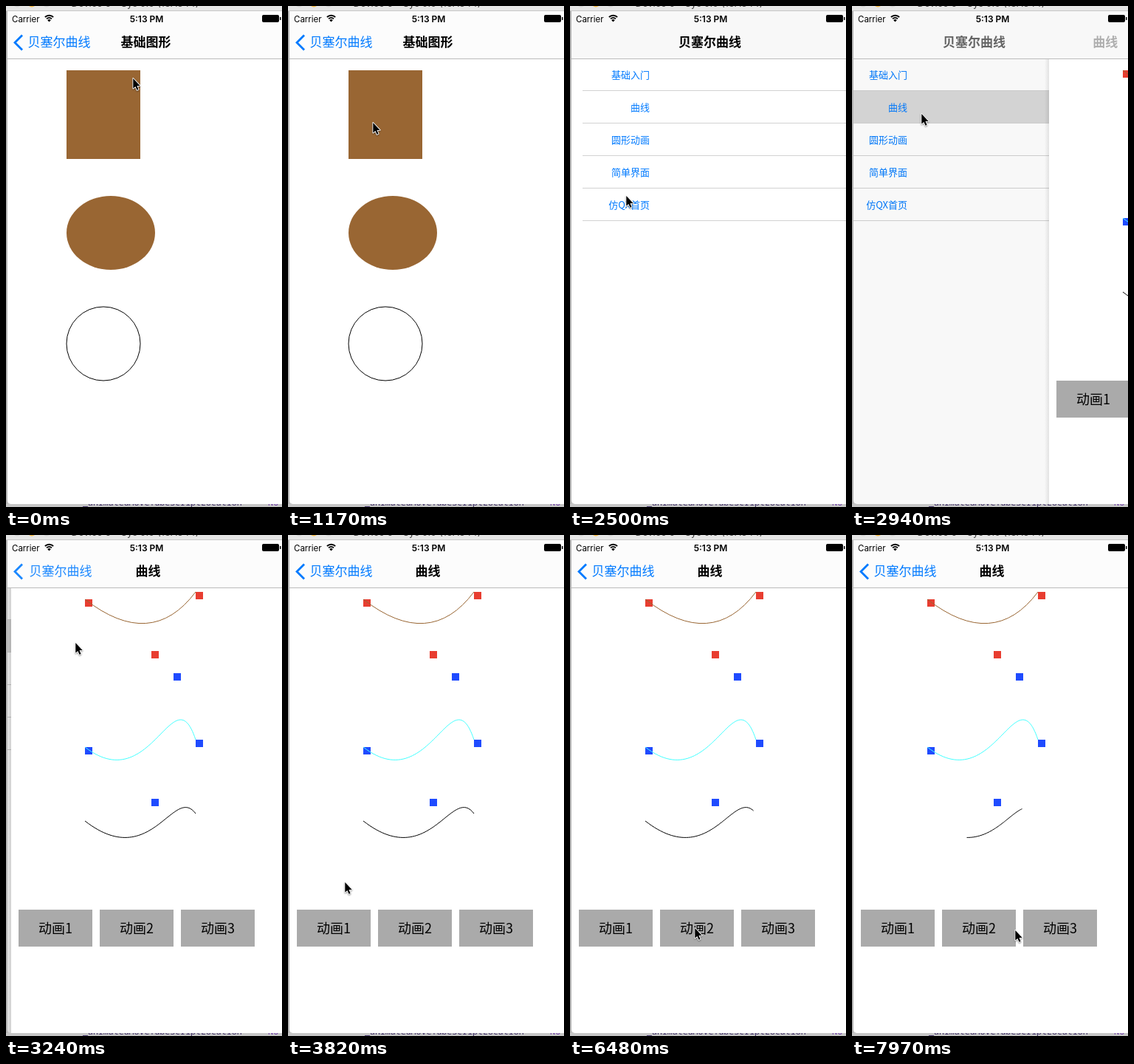
These frames come from a looping animation (374x678 px, 8 s). An HTML page with a canvas:

```html
<!DOCTYPE html>
<html lang="zh">
<head>
<meta charset="utf-8">
<style>
  html, body { margin: 0; width: 100%; height: 100%; overflow: hidden; }
  canvas { display: block; width: 374px; height: 678px; }
</style>
</head>
<body>
<canvas id="stage" width="374" height="678"></canvas>
<script>
const ctx = document.getElementById('stage').getContext('2d');
const LOOP = 8000, STEP = 147.5, WIDTH = 375, BAR_BOTTOM = 71;
const POP_START = 1911, PUSH_START = 2880, GROW_START = 4555, SPREAD_START = 6880;
const CJK = '"Noto Sans CJK SC", "Noto Sans CJK", sans-serif';
const LATIN = 'Inter, Roboto, sans-serif';
const BLUE = '#007aff';

// Resting points of the pointer: ms, x, y.
const pointerStops = [
  [0, 172, 97], [600, 205, 274], [1170, 115, 157], [1900, 43, 62], [2300, 43, 62],
  [2500, 76, 256], [2650, 94, 145], [3380, 94, 145], [3970, 74, 527],
  [5300, 74, 527], [6630, 172, 531], [7375, 172, 531], [7970, 221, 534]
];

const clamp = v => Math.max(0, Math.min(1, v));
const lerp = (a, b, k) => a + (b - a) * k;
const smooth = k => k * k * (3 - 2 * k);

// Critically damped spring from 0 to 1.
function spring(ms) {
  const x = Math.max(0, ms) * .018;
  return 1 - (1 + x) * Math.exp(-x);
}

function screenAt(time) {
  const pushing = time >= PUSH_START;
  const elapsed = time - (pushing ? PUSH_START : POP_START);
  const progress = spring(elapsed);
  const covered = pushing ? progress : 1 - progress;
  const fadeOut = (1 - progress) ** 1.5, fadeIn = progress ** 9;
  const travel = progress ** 1.3;
  const offset = Math.round(WIDTH * (1 - covered));
  return {
    pushing, covered, offset,
    rootX: lerp(189.5, 72, pushing ? travel : 1 - travel),
    rootBlack: pushing ? fadeOut : fadeIn,
    rootBlue: pushing ? fadeIn : fadeOut,
    titleX: 189.5 + offset * .58,
    highlight: pushing ? 1 : clamp(1.7 - elapsed / 250)
  };
}

function pointerAt(time) {
  const next = Math.max(1, pointerStops.findIndex(stop => stop[0] >= time));
  const [t0, x0, y0] = pointerStops[next - 1], [t1, x1, y1] = pointerStops[next];
  const k = smooth(clamp((time - t0) / (t1 - t0)));
  return [Math.round(lerp(x0, x1, k)), Math.round(lerp(y0, y1, k))];
}

function rect(x, y, w, h, fill) {
  ctx.fillStyle = fill;
  ctx.fillRect(x, y, w, h);
}

function text(str, x, y, font, fill = '#000', align = 'left', alpha = 1) {
  ctx.save();
  ctx.globalAlpha = alpha;
  ctx.font = font;
  ctx.fillStyle = fill;
  ctx.textAlign = align;
  ctx.fillText(str, x, y);
  ctx.restore();
}

function path(build, stroke, fill, width = 1) {
  ctx.beginPath();
  build();
  ctx.lineWidth = width;
  if (fill) { ctx.fillStyle = fill; ctx.fill(); }
  if (stroke) { ctx.strokeStyle = stroke; ctx.stroke(); }
}

function polyline(points) {
  points.forEach(([x, y]) => ctx.lineTo(x, y));
}

// Part of a cubic curve between the parameters from and to.
function cubic(points, color, from = 0, to = 1) {
  path(() => {
    for (let i = 0; i <= 60; i++) {
      const t = lerp(from, to, i / 60), u = 1 - t;
      const weights = [u * u * u, 3 * u * u * t, 3 * u * t * t, t * t * t];
      const sum = axis => weights.reduce((s, w, j) => s + w * points[j][axis], 0);
      ctx.lineTo(sum(0), sum(1));
    }
  }, color);
}

function drawDesktop() {
  rect(0, 0, 374, 678, '#c6c6c6');
  rect(0, 0, 374, 7, '#e6e6e6');
  ['#d2d2d2', '#f5b83d', '#d2d2d2'].forEach((color, i) =>
    path(() => ctx.arc(15 + 20 * i, -4.5, 6, 0, 7), null, color));
  text('Device 6 - Sys 9.0 (13A344)', 175, 1, '13px ' + LATIN, '#444', 'center');
  rect(0, 6, 374, 1, '#c8c8c8');
  text('_animatedMoveTubeScriptLocation', 104, 676, '11.6px "Noto Sans Mono", monospace', '#3b2a66');
  text('No', 355, 676, '12px "Noto Sans Mono", monospace', '#703daa');
  rect(0, 7, 2, 667, '#b4b4b4');
}

function drawList({ covered, pushing, highlight }) {
  const x = 2 - Math.round(.3 * WIDTH * covered);
  rect(2, 64, 372, 612, '#fff');
  if (covered > 0) {
    ctx.globalAlpha = highlight;
    rect(2, BAR_BOTTOM + (pushing ? 44 : 0), 372, 44, '#d9d9d9');
    ctx.globalAlpha = 1;
  }
  ['基础入门', '曲线', '圆形动画', '简单界面', '仿QX首页'].forEach((label, i) => {
    text(label, x + 106, 98 + 44 * i, '13px ' + CJK, BLUE, 'right');
    rect(Math.max(2, x + 15), 114 + 44 * i, 372, 1, '#d2d2d2');
  });
  rect(2, 64, 372, 612, `rgba(0,0,0,${.1 * covered})`);
}

function drawShapes() {
  rect(80, 87, 100, 120, '#996633');
  path(() => ctx.ellipse(140, 307, 60, 50, 0, 0, 7), null, '#996633');
  path(() => ctx.arc(130, 457, 50, 0, 7), '#000');
}

function drawCurves(time) {
  const squares = (color, corners) => corners.forEach(([x, y]) => rect(x, y, 10, 10, color));
  const start = [100, 287], pull = [190, 357], lift = [220, 187], end = [250, 277];
  squares('#e83d30', [[100, 87], [190, 157], [250, 77]]);
  squares('#1f4bff', [start, pull, lift, end]);
  path(() => {
    ctx.moveTo(100, 87);
    ctx.quadraticCurveTo(190, 157, 250, 77);
  }, '#996633');
  cubic([start, pull, lift, end], '#4ff');

  // First the line grows from its start, later from its middle to both ends.
  const grow = (time - GROW_START) / 2000, spread = (time - SPREAD_START) / 4000;
  const from = spread > 0 ? .5 - spread : 0;
  const to = spread > 0 ? .5 + spread : grow > 0 ? Math.min(1, grow) : 1;
  cubic([[100, 387], [190, 457], [220, 337], [250, 377]], '#000', from, to);

  for (let i = 0; i < 3; i++) {
    rect(10 + 110 * i, 507, 100, 50, '#aaa');
    text('动画' + (i + 1), 60 + 110 * i, 539, '18px ' + CJK, '#000', 'center');
  }
}

function drawPage({ offset, pushing }, time) {
  const left = 2 + offset;
  const shade = ctx.createLinearGradient(left - 6, 0, left, 0);
  shade.addColorStop(0, 'rgba(0,0,0,0)');
  shade.addColorStop(1, 'rgba(0,0,0,.09)');
  rect(left - 6, 64, 6, 612, shade);
  rect(left, 64, 374, 612, '#fff');
  ctx.save();
  ctx.translate(left, 0);
  if (pushing) drawCurves(time); else drawShapes();
  ctx.restore();
}

function drawBar({ covered, pushing, rootX, rootBlack, rootBlue, titleX }) {
  rect(2, 7, 372, 64, covered < .5 ? '#f8f8f8' : '#fcfcfc');
  rect(2, BAR_BOTTOM, 372, 1, '#bcbcbc');

  text('Carrier', 8, 21.5, '11.5px ' + LATIN);
  text('5:13 PM', 190.5, 21.5, '600 12px ' + LATIN, '#000', 'center');
  [8.2, 5].forEach(r => path(() => ctx.arc(58.5, 21, r, -2.33, -.81), '#000', null, 1.9));
  path(() => { ctx.moveTo(58.5, 21.5); ctx.arc(58.5, 21.5, 3.2, -2.35, -.79); }, null, '#000');
  path(() => ctx.roundRect(347, 12, 23, 10, 2), null, '#000');
  rect(371, 15, 1.5, 4, '#000');

  ctx.globalAlpha = rootBlue;
  path(() => polyline([[22, 39.5], [12, 49.5], [22, 59.5]]), BLUE, null, 2.8);
  ctx.globalAlpha = 1;
  const root = '贝塞尔曲线', bold = 'bold 17px ' + CJK;
  text(root, rootX, 55, '17px ' + CJK, BLUE, 'center', rootBlue);
  text(root, rootX, 55, bold, '#000', 'center', rootBlack);
  text(pushing ? '曲线' : '基础图形', titleX, 55, bold, '#000', 'center', covered);
}

function drawPointer([x, y]) {
  ctx.save();
  ctx.translate(x, y);
  ctx.lineJoin = 'round';
  const arrow = () => {
    polyline([[.3, 1], [.3, 14.6], [3.4, 11.9], [5.5, 16.8], [7.6, 15.9], [5.5, 11.1], [9.7, 10.9]]);
    ctx.closePath();
  };
  ctx.shadowColor = 'rgba(0,0,0,.35)';
  ctx.shadowBlur = 2;
  ctx.shadowOffsetY = 1;
  path(arrow, '#fff', '#fff', 1.8);
  ctx.shadowColor = 'transparent';
  path(arrow, null, '#000');
  ctx.restore();
}

function draw(now) {
  // The picture advances in equal steps.
  const step = Math.floor((now % LOOP + 15) / STEP);
  const time = Math.max(0, step * STEP - 10);
  const screen = screenAt(time);
  drawDesktop();
  ctx.save();
  ctx.beginPath();
  ctx.roundRect(2, 7, 380, 667, [0, 0, 5, 5]);
  ctx.clip();
  drawList(screen);
  drawPage(screen, time);
  drawBar(screen);
  ctx.restore();
  drawPointer(pointerAt(time));
}

function tick() {
  draw(performance.now());
  requestAnimationFrame(tick);
}
tick();
</script>
</body>
</html>
```
